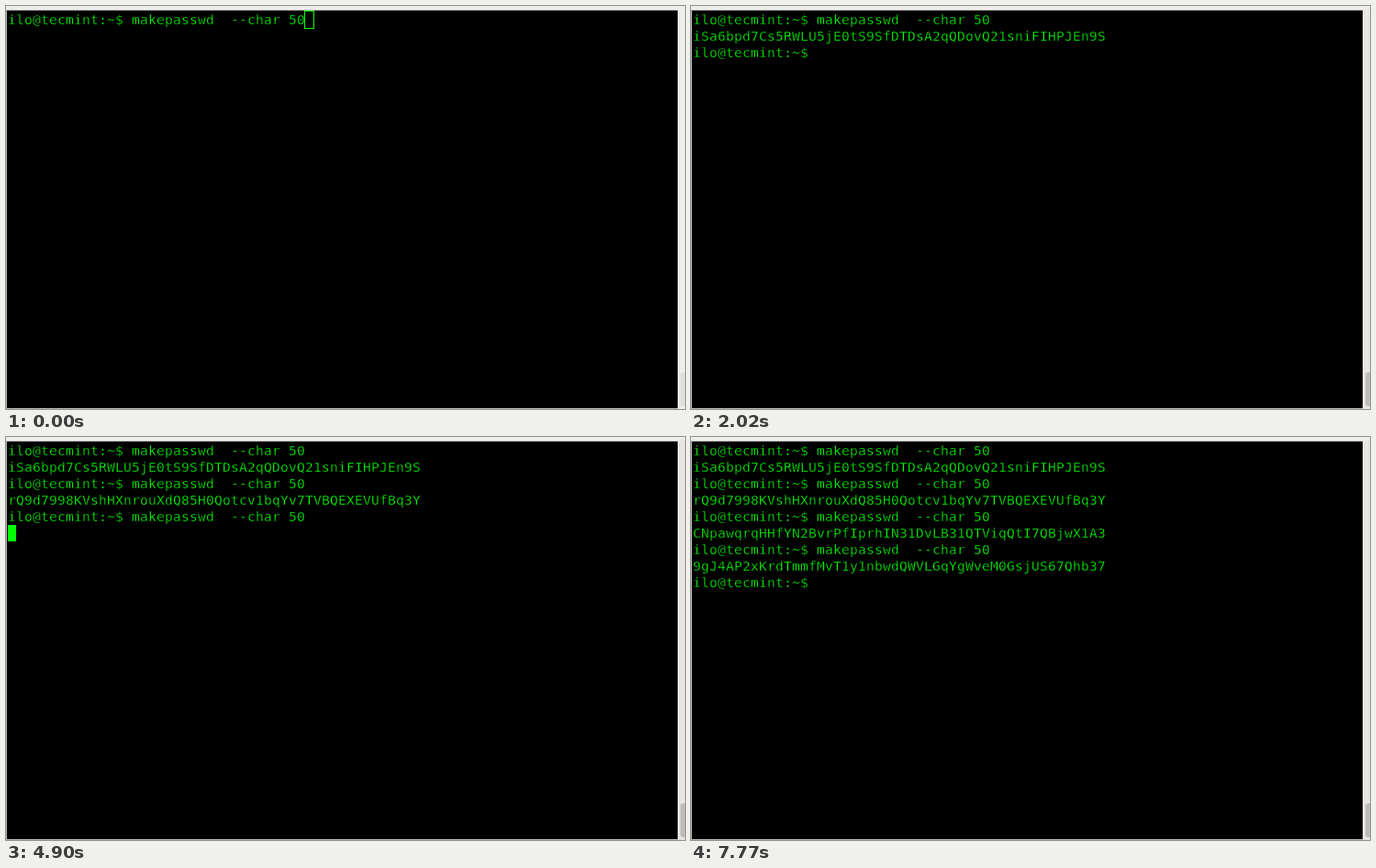
An HTML page for the animation above (8 s loop, 740 by 440 pixels).

```html
<!DOCTYPE html>
<html lang="en">
<head>
<meta charset="utf-8">
<title>Terminal</title>
<style>
  html, body { margin: 0; width: 740px; height: 440px; overflow: hidden; }
  body { position: relative; background: #e8e5e3; }
  body.idle { background: #efedec; }
  div, pre, svg { position: absolute; box-sizing: border-box; }
  #top { left: 0; top: 0; width: 740px; height: 4px; background: #ededed; }
  #screen {
    left: 0; top: 4px; width: 732px; height: 436px; background: #000;
    border: solid #b9b6b3; border-width: 1px 0 1px 1px;
  }
  #thumb {
    left: 735px; top: 400px; width: 8px; height: 37px;
    border-radius: 3px; background: #bfbbb8;
  }
  .idle #thumb { background: #e0dedc; }
  /* The black stroke thins the letters to about one pixel. */
  #text {
    left: 2px; top: 6px; margin: 0; color: #0f0;
    font: 11pt/18px "DejaVu Sans Mono", monospace; letter-spacing: calc(9px - 1ch);
    -webkit-text-stroke: .3px #000;
  }
  #cursor { width: 9px; height: 18px; background: #0f0; }
  .idle #cursor {
    width: 11px; height: 20px; margin: -1px; background: none; border: 1px solid #0f0;
  }
  #pointer { left: 0; top: 0; }
</style>
</head>
<body>
<div id="top"></div>
<div id="screen"></div>
<div id="thumb"></div>
<pre id="text"></pre>
<div id="cursor"></div>
<svg id="pointer" width="7" height="16" fill="none">
  <path d="M0 1.5H7M0 14.5H7M3.5 1V15" stroke="#fff" stroke-width="3"/>
  <path d="M1 1.5H6M1 14.5H6M3.5 1V15" stroke="#000"/>
</svg>
<script>
const LOOP = 8000, CELL = 9, ROW = 18;
const PROMPT = 'ilo@tecmint:~$ ', COMMAND = 'makepasswd  --char 50';
const runs = [
  { recall: 0, enter: 1430, done: 1480, output: 'iSa6bpd7Cs5RWLU5jE0tS9SfDTDsA2qQDovQ21sniFIHPJEn9S' },
  { recall: 2800, enter: 3090, done: 3150, output: 'rQ9d7998KVshHXnrouXdQ85H0Qotcv1bqYv7TVBQEXEVUfBq3Y' },
  { recall: 4370, enter: 4900, done: 5020, output: 'CNpawqrqHHfYN2BvrPfIprhIN31DvLB31QTViqQtI7QBjwX1A3' },
  { recall: 6790, enter: 7190, done: 7240, output: '9gJ4AP2xKrdTmmfMvT1y1nbwdQWVLGqYgWveM0GsjUS67Qhb37' },
];
const blinks = [[2020, 2620], [3700, 4270], [5490, 6080], [6690, 6750], [7770, LOOP]];
const FOCUS = 980, POINTER_IN = 420, POINTER_OUT = 1390, POINTER_STEP = 40;

const [text, cursor, pointer] = ['text', 'cursor', 'pointer'].map(id => document.getElementById(id));
const show = (el, visible) => { el.style.visibility = visible ? 'visible' : 'hidden'; };
const place = (el, x, y) => { el.style.transform = `translate(${x}px, ${y}px)`; };

function session(t) {
  let log = PROMPT;
  for (const { recall, enter, done, output } of runs) {
    if (t >= recall) log += COMMAND;
    if (t >= enter) log += '\n';
    if (t >= done) log += output + '\n' + PROMPT;
  }
  return log;
}

function movePointer(t) {
  show(pointer, t >= POINTER_IN && t < POINTER_OUT);
  const step = Math.min(5, Math.max(0, Math.floor((t - POINTER_IN) / POINTER_STEP)));
  const left = (1 - step / 5) ** 2;
  place(pointer, Math.round(497 + 237 * left), Math.round(278 + 69 * left));
}

function draw(now) {
  const t = now % LOOP;
  const log = session(t);
  if (text.textContent !== log) text.textContent = log;

  const lines = log.split('\n');
  place(cursor, 2 + CELL * lines.at(-1).length, 6 + ROW * (lines.length - 1));
  show(cursor, !blinks.some(([off, on]) => t >= off && t < on));

  document.body.classList.toggle('idle', t < FOCUS);
  movePointer(t);
  requestAnimationFrame(draw);
}
draw(0);
</script>
</body>
</html>
```
